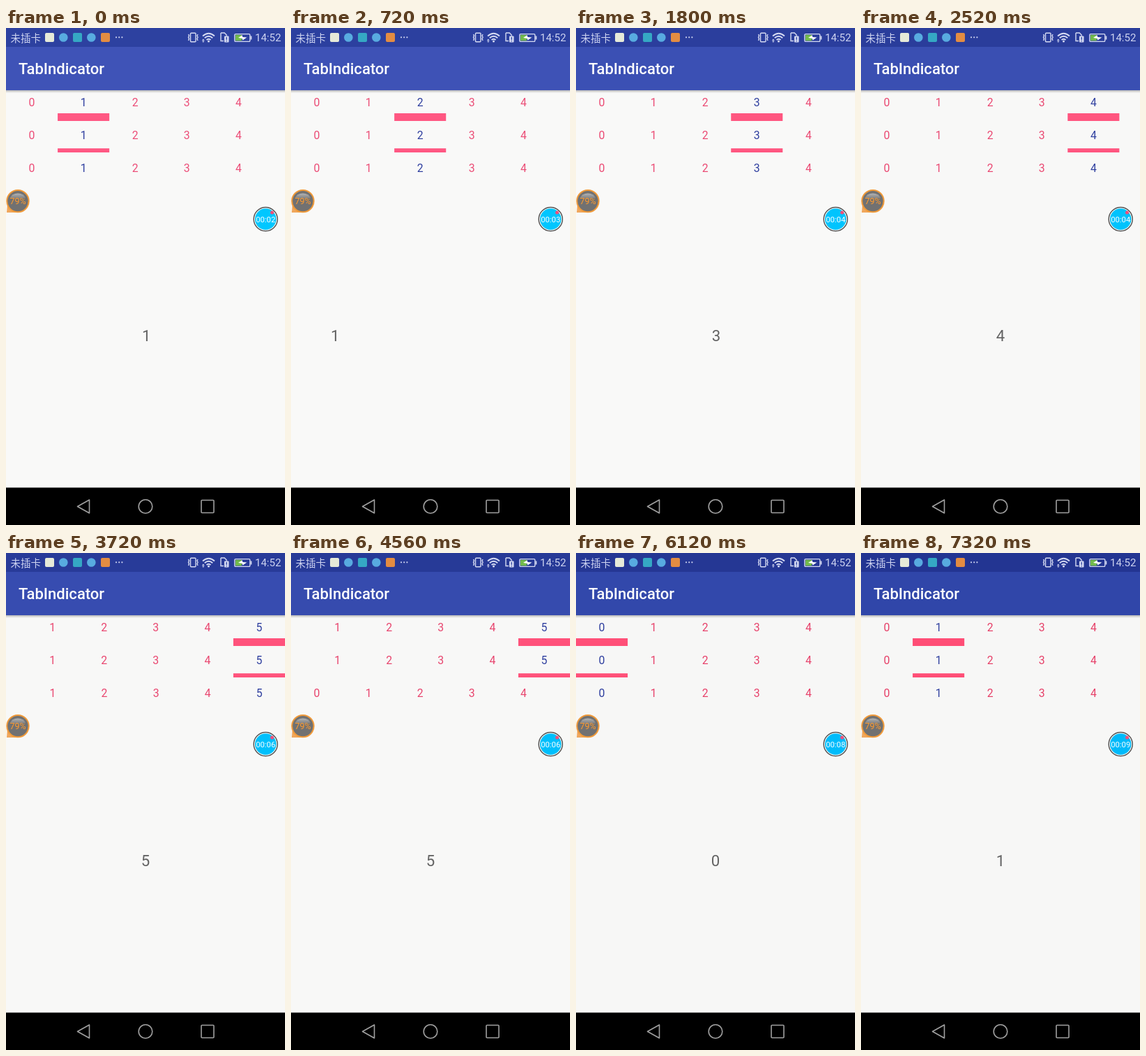
Write an HTML page that moves like this. It is 400x711 px and loops after 7.92 s.

```html
<!DOCTYPE html>
<html lang="en">
<head>
<meta charset="utf-8">
<title>TabIndicator</title>
<style>
  html, body { margin: 0; width: 100%; height: 100%; overflow: hidden; background: #f8f8f7; }
  svg { display: block; width: 100%; height: 100%; font-family: Roboto, "Noto Sans CJK SC", "Noto Sans CJK", sans-serif; }
  .mid { text-anchor: middle; }
  .tab { font-size: 15.8px; }
  .page { font-size: 22.2px; fill: #636363; }
  .line { fill: none; stroke: #d5daf2; stroke-width: 1.4; }
  .nav { fill: none; stroke: #a0a0a0; stroke-width: 1.6; stroke-linejoin: round; }
</style>
</head>
<body>
<svg viewBox="0 0 400 711">
  <defs>
    <linearGradient id="shade" x2="0" y2="1">
      <stop stop-color="#000" stop-opacity=".26"/>
      <stop offset="1" stop-color="#000" stop-opacity="0"/>
    </linearGradient>
    <linearGradient id="gloss" x2="0" y2="1">
      <stop stop-color="#b4b4b4"/>
      <stop offset="1" stop-color="#777"/>
    </linearGradient>
  </defs>
  <rect id="paper" width="400" height="711"/>
  <g id="pages"></g>
  <g id="rows"></g>

  <rect y="89" width="400" height="4" fill="url(#shade)"/>
  <rect id="toolbar" y="26" width="400" height="63"/>
  <rect id="status" width="400" height="27"/>
  <text x="18" y="66.3" font-size="22" font-weight="500" fill="#fff">TabIndicator</text>

  <g fill="#cdd3f0">
    <text x="6.5" y="19.5" font-size="14.5">未插卡</text>
    <text x="357" y="19.4" font-size="15">14:52</text>
    <circle cx="158" cy="13.3" r="1.1"/><circle cx="162.2" cy="13.3" r="1.1"/><circle cx="166.4" cy="13.3" r="1.1"/>
  </g>
  <rect x="56" y="7" width="13" height="13" rx="2" fill="#e6ead8"/>
  <circle cx="82.3" cy="13.5" r="6.3" fill="#58abe0"/>
  <rect x="96" y="7" width="13" height="13" rx="2" fill="#35a8c4"/>
  <circle cx="122.3" cy="13.5" r="6.3" fill="#58abe0"/>
  <rect x="136" y="7" width="13" height="13" rx="2" fill="#e38c42"/>

  <g class="line">
    <rect x="264.5" y="7.2" width="7.5" height="12.6" rx="1"/>
    <path d="M261.5 9l1 2-1 2.3 1 2.3-1 2.4M275 9l-1 2 1 2.3-1 2.3 1 2.4"/>
    <path d="M282 11.5q8.5-7.6 17 0M284.8 14.3q5.7-5 11.4 0M287.5 17q3-2.6 6 0" stroke-width="1.8"/>
    <path d="M308 7h5.2l3 3v1.5M312 18.5h-4V7"/>
    <rect x="327.8" y="8.6" width="22" height="10.8" rx="1.5"/>
  </g>
  <g fill="#d5daf2">
    <circle cx="290.5" cy="19" r="1.5"/>
    <path d="M281 18l1.8-2.5 1.8 2.5zM281 18.8h3.6l-1.8 2z"/>
    <rect x="313" y="11.5" width="6.5" height="9" rx="1"/>
    <rect x="350.5" y="11.5" width="1.8" height="5"/>
  </g>
  <path d="M316.2 13v4M316.2 18v1.3" stroke="#2c41a0" stroke-width="1.3"/>
  <rect x="329" y="9.8" width="9" height="8.4" fill="#72b94c"/>
  <path d="M333 14l5.6-3.8.7 2.7 6 .5-6 4.2-.7-2.7z" fill="#fff"/>

  <path d="M2 251L1 264H17z" fill="#f0a75c"/>
  <circle cx="17" cy="247.6" r="15.7" fill="#717171" stroke="#f09a3a" stroke-width="2"/>
  <path d="M6 243a11.6 9.6 0 0 1 22 0q-11 4-22 0z" fill="url(#gloss)"/>
  <text class="mid" x="17" y="252.2" font-size="12.5" fill="#ff9a2e">79%</text>

  <circle cx="372.2" cy="273.5" r="17" fill="#fff" stroke="#555" stroke-width="1.5"/>
  <circle id="disc" cx="372.2" cy="273.5" r="15.2"/>
  <circle cx="381.5" cy="264" r="2.5" fill="#f0507c"/>
  <text id="clock" class="mid" x="372.2" y="277.7" font-size="11.3" fill="#fff"></text>

  <rect y="657.5" width="400" height="54"/>
  <g class="nav">
    <path d="M102.5 684.5L119.5 675V694z"/>
    <circle cx="200" cy="684.5" r="9.8"/>
    <rect x="280" y="675.5" width="18" height="18" rx="1"/>
  </g>
</svg>
<script>
const LOOP = 7920, STEP = 120;
const TAB = 400 / 5.4, TABS = 6, MAX_SCROLL = TAB * TABS - 400;
const $ = id => document.getElementById(id);
const clamp = x => Math.min(1, Math.max(0, x));
const part = (t, a, b) => clamp((t - a) / (b - a));
const settle = u => 1 - (1 - u) ** 5;
const smooth = u => u * u * (3 - 2 * u);

// Page changes: drag from start to release, then settle until end.
const moves = [
  { from: 0, to: 1, start: -500, release: -400, end: 200, drag: .25 },
  { from: 1, to: 2, start: 560, release: 700, end: 1300, drag: .22 },
  { from: 2, to: 3, start: 1450, release: 1550, end: 1920, drag: .25 },
  { from: 3, to: 4, start: 1960, release: 2080, end: 2520, drag: .25 },
  { from: 4, to: 5, start: 2650, release: 2750, end: 3130, drag: .25 },
  { from: 5, to: 0, start: 4620, release: 4620.1, end: 5250, drag: 0 },
  { from: 0, to: 1, start: 6650, release: 6770, end: 7320, drag: .25 }
];

function pageAt(t) {
  const m = moves.filter(m => m.start <= t).pop();
  const pulled = m.drag * part(t, m.start, m.release);
  const done = pulled + (1 - m.drag) * settle(part(t, m.release, m.end));
  return m.from + (m.to - m.from) * done;
}
const selectedAt = t => moves.filter(m => m.release <= t).pop().to;

function scrollAt(t, byHand) {
  const open = smooth(part(t, 2750, 3000));
  const back = byHand ? part(t, 3690, 4310) : part(t, 4620, 4870);
  return MAX_SCROLL * (open - smooth(back));
}

function mix(a, b, u) {
  return `rgb(${a.map((v, i) => Math.round(v + (b[i] - v) * u))})`;
}

const rows = [
  { y: 111.7, bar: [122, 11] },
  { y: 159.2, bar: [172.2, 5.8] },
  { y: 206.3 }
];
const digits = [...Array(TABS).keys()];
const label = (cls, x, y, n) => `<text class="mid ${cls}" x="${x}" y="${y}">${n}</text>`;

$("pages").innerHTML = digits.map(n => label("page", 200 + 400 * n, 448.3, n)).join("");
$("rows").innerHTML = rows.map(({ y, bar }) => "<g>" +
  (bar ? `<rect y="${bar[0]}" width="${TAB}" height="${bar[1]}"/>` : "") +
  digits.map(n => label("tab", TAB * (n + .5), y, n)).join("") + "</g>").join("");

function draw(t) {
  const u = t / 7320, selected = selectedAt(t);
  const pink = mix([255, 88, 131], [255, 78, 118], u);
  const plain = mix([236, 78, 120], [230, 64, 104], u);

  $("paper").setAttribute("fill", mix([249, 249, 248], [247, 247, 246], u));
  $("toolbar").setAttribute("fill", mix([63, 83, 183], [48, 70, 169], u));
  $("status").setAttribute("fill", mix([45, 65, 160], [35, 53, 146], u));
  $("disc").setAttribute("fill", mix([0, 199, 255], [0, 186, 250], u));
  $("clock").textContent = "00:0" + (3 + Math.floor((t - 660) / 1000));
  $("pages").setAttribute("transform", `translate(${-400 * pageAt(t)})`);

  [...$("rows").children].forEach((row, i) => {
    row.setAttribute("transform", `translate(${-scrollAt(t, i === 2)})`);
    row.querySelectorAll("text").forEach((el, n) =>
      el.setAttribute("fill", n === selected ? "#2f3f9f" : plain));
    const bar = row.querySelector("rect");
    if (bar) {
      bar.setAttribute("x", TAB * selected);
      bar.setAttribute("fill", pink);
    }
  });
}

const began = performance.now();
function tick() {
  const t = (performance.now() - began) % LOOP;
  draw(Math.min(7320, Math.floor(t / STEP) * STEP));
  requestAnimationFrame(tick);
}
tick();
</script>
</body>
</html>
```
